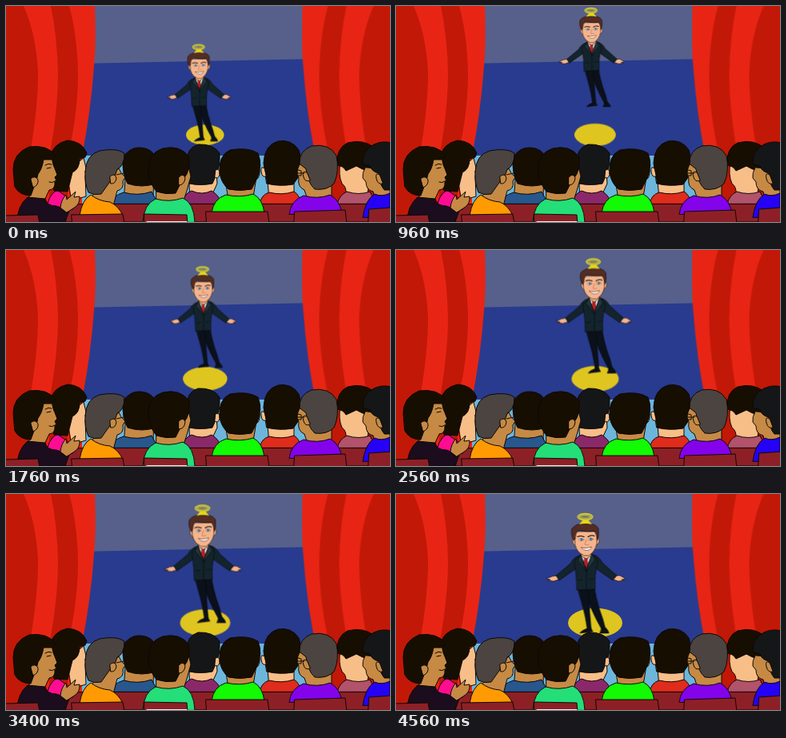
These frames come from a looping animation (480 by 270 pixels, 4.84 s). An HTML page:

```html
<!DOCTYPE html>
<html lang="en">
<head>
<meta charset="utf-8">
<title>On stage</title>
<style>
  html, body { margin: 0; width: 100%; height: 100%; overflow: hidden; background: #293b8e; }
  svg { display: block; width: 100vw; height: 100vh; }
  .ink { stroke: #0d0805; stroke-linejoin: round; stroke-linecap: round; }
  .line { fill: none; }
  .bright { fill: #e82514; }
  .dark { fill: #c21807; }
  .seat { fill: #8d2026; }
  .tan { fill: #c68a45; }
  .light { fill: #f8be87; }
  .hair { fill: #170e02; }
  .grey { fill: #4c4440; }
  .coal { fill: #151617; }
  .suit { fill: #13242d; }
  .leg { fill: #0a111a; }
  .face { fill: #f6b48c; }
</style>
</head>
<body>
<svg viewBox="0 0 480 270" preserveAspectRatio="none">
  <defs>
    <g id="curtain">
      <path class="bright" d="M0 0H111Q113 45 110 75Q106 132 95 187V270H0Z"/>
      <path class="dark" d="M0 0H22Q38 36 40 84Q40 130 29 190V270H0Z"/>
      <path class="dark" d="M56 0H79Q89 36 90 84Q90 134 77 190V270H54V190Q65 130 65 84Q64 38 56 0Z"/>
    </g>
  </defs>

  <path fill="#293b8e" d="M0 0H480V270H0Z"/>
  <path fill="#56608b" d="M90 0H390V66L90 72Z"/>
  <path fill="#6cb6dc" d="M80 187H400V250H80Z"/>

  <g id="spot"><ellipse rx="34" ry="18.3" fill="#dfc51f"/></g>

  <g id="man">
    <g class="ink" stroke-width=".6" transform="translate(-237.5 -174)">
      <!-- legs -->
      <path class="leg" d="M236 117H248Q250 130 254 143Q259 156 262 169H257Q249 155 244 143Q240 131 236 117Z"/>
      <path class="leg" d="M227 117H239Q242 134 242 146L244 169H239Q237 154 234 143Z"/>
      <path class="leg" d="M239 168H244L246 172L230 174Q231 171 239 168Z"/>
      <path class="leg" d="M257 168L262 167Q266 171 266 174H255Z"/>
      <!-- hands and arms -->
      <path class="face" d="M201 102L195 103L188 106L193 107L190 108L197 109L203 107Z"/>
      <path class="face" d="M273 102L280 102L287 106L282 107L285 108L278 109L272 107Z"/>
      <path class="suit" d="M229 77Q222 79 218 87L200 102L204 108L224 94Z"/>
      <path class="suit" d="M247 76Q254 78 258 86L276 102L271 108L251 94Z"/>
      <!-- jacket -->
      <path class="suit" d="M230 77L246 76Q252 79 252 86Q248 100 249 119L226 120Q226 102 223 86Q224 80 230 77Z"/>
      <path fill="#f4f2ee" d="M231 76L245 75L238 93Z"/>
      <path fill="#c81920" d="M236 79H240L239 83L240 89L238 92L235 88Z"/>
      <path fill="#20353e" d="M231 76L227 83L230 86L238 97L234 86Z"/>
      <path fill="#20353e" d="M245 75L249 82L246 86L238 97L241 86Z"/>
      <path class="line" d="M238 97L238 119M228 108L233 107M242 107L247 106"/>
      <!-- head -->
      <path class="face" d="M232 71H244L244 77L238 81L232 78Z"/>
      <path class="face" d="M223 56Q219 55 221 60Q222 65 225 64ZM251 55Q255 54 254 59Q253 64 250 63Z"/>
      <path class="face" d="M223 47H251L251 62Q249 72 241 77H235Q226 73 224 64Z"/>
      <path fill="#532d23" d="M222 58Q218 50 220 43Q226 36 237 37Q249 36 253 43Q254 51 252 58Q251 51 248 46Q240 48 228 45Q224 49 224 56Z"/>
      <path class="line" stroke-width="1.1" d="M227 53.5Q230 51.5 235 53.5M240 53.5Q244 50.5 248 52.5"/>
      <g stroke-width=".4" fill="#fff">
        <ellipse cx="231.5" cy="57" rx="2.8" ry="1.6"/>
        <ellipse cx="243.5" cy="56.5" rx="2.8" ry="1.6"/>
      </g>
      <g stroke="none" fill="#27628c">
        <circle cx="231.8" cy="57" r="1.4"/>
        <circle cx="243.6" cy="56.5" r="1.4"/>
      </g>
      <path class="line" stroke="#a8644a" d="M238 57L236 63Q238 65 241 63"/>
      <path fill="#fff" stroke="#4a221a" d="M231.5 67Q238 69 244.5 66Q243 70.5 238 70.5Q234 70.5 231.5 67Z"/>
      <!-- halo -->
      <path fill="#e7d51a" stroke="none" d="M234 32H240L245 38Q237 36 229 38Z"/>
      <g stroke="#e0d22a">
        <ellipse cx="236.5" cy="28.5" rx="9.3" ry="4" fill="#a3a557" stroke-width="1.3"/>
        <ellipse cx="236.5" cy="28.5" rx="6" ry="2" fill="#77805f"/>
      </g>
    </g>
  </g>

  <use href="#curtain"/>
  <use href="#curtain" transform="matrix(-1 0 0 1 481.5 0)"/>

  <g class="ink">
    <path class="seat" d="M75 248L130 247H480V270H75Z"/>

    <!-- back row -->
    <path class="tan" d="M150 208L185 206L184 238H148Z"/>
    <path fill="#28578e" d="M131 247Q133 237 147 233Q165 238 182 232L190 247Z"/>
    <path class="hair" d="M146 190Q154 176 168 177Q183 178 187 190V222Q170 228 152 222Q145 210 146 190Z"/>

    <path class="light" d="M229 212L263 206L264 222L257 237H230Z"/>
    <path fill="#8b2869" d="M220 247Q222 235 232 231Q245 237 257 231Q267 237 269 247Z"/>
    <path class="coal" d="M226 196Q225 178 240 173Q259 172 267 184Q268 197 264 208L258 222Q243 225 229 222Z"/>
    <path class="light" d="M262 205Q268 202 267 211Q265 217 261 214Z"/>

    <path class="light" d="M327 214H360L360 238H329Z"/>
    <path fill="#df2c1c" d="M317 247Q319 236 329 233Q345 237 360 232Q367 236 369 247Z"/>
    <path class="hair" d="M322 196Q323 174 340 169Q357 166 366 180Q371 195 366 213L359 223Q341 226 326 222Z"/>
    <path class="light" d="M323 203Q318 199 319 207Q320 215 325 213Z"/>

    <path class="light" d="M418 196H456L452 236H425Q426 226 420 222Q415 211 418 196Z"/>
    <path fill="#b2526b" d="M414 247Q417 236 426 232Q441 237 455 232L462 247Z"/>
    <path class="hair" d="M414 196Q413 178 427 171Q447 166 460 177L458 207Q447 206 438 200L425 206Q422 200 414 199Z"/>

    <path class="light" d="M76 206L97 190Q99 198 101 207L99 213L100 238L82 243Z"/>
    <path fill="#ff0d91" d="M50 257Q52 236 64 230L78 240L83 254Z"/>
    <path class="hair" d="M55 190Q58 172 77 168Q95 169 101 184L99 189L92 191Q92 204 83 208L77 232L60 231Q53 212 55 190Z"/>

    <!-- front row -->
    <path class="tan" d="M38 193L57 186Q58 198 61 203L64 211L61 214Q64 218 61 220Q62 229 54 230L47 245H28Z"/>
    <path fill="#1b0d1d" d="M14 270Q14 250 27 239L49 241Q51 250 63 250L79 256L74 270Z"/>
    <path class="hair" d="M9 204Q9 184 29 176Q52 173 62 187L57 192L47 192Q45 204 40 210Q38 221 35 226L31 237Q17 237 11 226Z"/>
    <path class="tan" d="M31 216Q36 211 40 217Q41 224 34 227Z"/>
    <path class="line" d="M49 199Q53 196 57 198M51 203L56 202M54 220Q58 222 61 219"/>
    <path class="tan" d="M68 252Q69 242 75 236L76 242L87 232L85 239L92 238Q93 248 84 253L76 258Z"/>

    <path class="tan" d="M114 226L141 203Q143 209 149 214L146 219Q148 229 139 231L134 250L108 239Z"/>
    <path fill="#ff9a03" d="M92 262Q95 242 106 236Q116 244 130 245Q141 250 146 262Z"/>
    <path class="grey" d="M99 207Q100 186 117 181Q139 177 148 184Q148 200 139 204Q136 215 131 218L119 235Q110 237 103 233Q98 221 99 207Z"/>
    <path class="tan" d="M130 213Q136 208 138 215Q137 223 131 222Z"/>
    <path class="line" d="M138 211L147 209"/>

    <path class="tan" d="M188 222L229 204L231 213L226 231L221 246L188 245Z"/>
    <path fill="#24de78" d="M171 270Q172 248 187 241Q204 246 221 240Q235 246 236 270Z"/>
    <path class="hair" d="M178 205Q177 184 196 178Q218 173 229 189Q230 201 226 210L218 222L212 234Q200 236 188 232Q178 220 178 205Z"/>
    <path class="tan" d="M216 214Q222 208 224 215Q223 224 216 224Z"/>

    <path class="tan" d="M274 216L313 214L309 239H278Z"/>
    <path class="tan" d="M313 204Q318 200 317 209Q316 218 311 216Z"/>
    <path fill="#12fa04" d="M257 259Q259 241 275 236Q293 240 309 235Q321 241 323 259Z"/>
    <path class="hair" d="M267 209Q265 187 280 180Q302 176 315 184Q321 199 314 215L307 229Q292 232 278 229Q269 221 267 209Z"/>

    <path class="tan" d="M368 197Q364 202 364 210L366 215Q364 226 373 230L377 242H407V220Z"/>
    <path fill="#8303eb" d="M354 260Q356 243 372 237Q390 242 405 236Q418 243 420 260Z"/>
    <path class="grey" d="M367 197Q366 181 382 175Q404 171 413 187Q417 207 410 222Q401 231 386 229Q377 221 375 204Z"/>
    <path class="tan" d="M376 208Q369 205 372 214Q374 221 380 218Z"/>
    <path class="line" d="M364 209H373M365 205L369 206V212H365"/>

    <path class="tan" d="M449 202Q445 209 446 215L450 220Q450 230 459 232L461 241H480V205Z"/>
    <path fill="#2502f6" d="M446 264Q449 242 461 235Q469 239 480 234V264Z"/>
    <path class="coal" d="M446 197Q445 180 460 173Q471 168 481 171V230H473Q466 222 466 209Q457 207 455 200Z"/>
    <path class="tan" d="M467 211Q461 207 463 216Q465 224 471 222Z"/>

    <!-- seats -->
    <path class="seat" d="M-2 262L40 261L42 272H-2ZM82 261L146 260L148 272H83ZM173 260L226 261L227 272H173ZM250 257L327 257L329 272H251ZM361 257L424 255L426 272H360ZM454 254L482 252V272H453Z"/>
    <path class="line" stroke="#eee" d="M176 269.5H226"/>
  </g>
</svg>
<script>
  const LOOP = 4840, FRAME = 40;

  // Rows of [time, x, y, scale], played at 25 pictures a second.
  function play(id, rows) {
    const end = rows[rows.length - 1];
    const frames = [...rows, [LOOP, ...end.slice(1)]].map(([time, x, y, scale], i, all) => {
      const next = i + 1 < all.length ? all[i + 1][0] : time + FRAME;
      return {
        offset: time / LOOP,
        transform: `translate(${x}px, ${y}px) scale(${scale})`,
        easing: `steps(${(next - time) / FRAME})`
      };
    });
    document.getElementById(id).animate(frames, { duration: LOOP, iterations: Infinity });
  }

  play("man", [
    [0, 241.5, 169, .81],
    [280, 242.5, 163, .817],
    [560, 243.5, 152, .825],
    [960, 244.5, 126, .828],
    [1120, 245, 128.5, .83],
    [1760, 246.5, 147, .845],
    [2240, 247, 151, .9],
    [2560, 247.5, 154, .957],
    [2800, 247.5, 156, .965],
    [3400, 246.5, 161, .984],
    [3920, 240.5, 169, .99],
    [4480, 237.5, 174, 1]
  ]);
  play("spot", [
    [0, 248.8, 161, .7],
    [4560, 249, 161, 1]
  ]);
</script>
</body>
</html>
```
